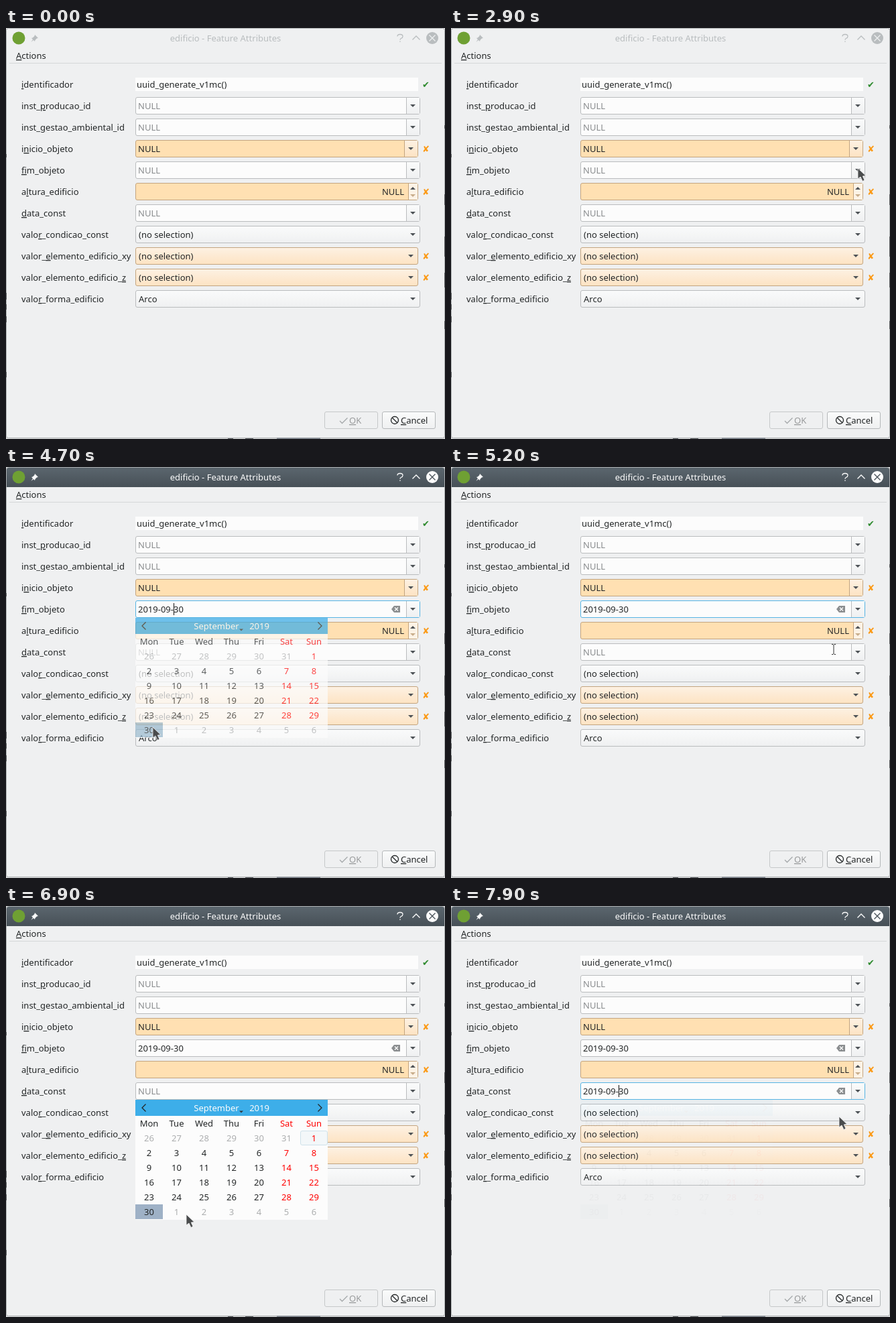
Write an HTML page that moves like this. It is 655 px wide and 613 px high and loops after 8 s.

```html
<!DOCTYPE html>
<html lang="en">
<head>
<meta charset="utf-8">
<title>Feature Attributes</title>
<style>
html, body { margin: 0; width: 100%; height: 100%; overflow: hidden; background: #d9dadb; }
svg { display: block; width: 655px; height: 613px; }
text { font: 13px "Noto Sans", sans-serif; fill: #232627; white-space: pre; }
.u { text-decoration: underline; text-decoration-skip-ink: none; }
.null { fill: #888b8d; }
.mid { text-anchor: middle; }
.end { text-anchor: end; }
.mark { font: 13px "DejaVu Sans", sans-serif; text-anchor: middle; }
.line { fill: none; stroke-width: 1.3; }
.out { fill: #acaeaf; }
.red { fill: #f00; }
.white { fill: #fcfcfc; }
</style>
</head>
<body>
<svg id="stage" viewBox="0 0 655 613"></svg>
<script>
const ORANGE = '#ffe0b2', ORANGE_EDGE = '#c3a580', GREY_EDGE = '#babcbe';
const stage = document.getElementById('stage');

const text = (x, y, s, cls = '', extra = '') => `<text x="${x}" y="${y}" class="${cls}" ${extra}>${s}</text>`;
const rect = (x, y, w, h, fill, extra = '') => `<rect x="${x}" y="${y}" width="${w}" height="${h}" fill="${fill}" ${extra}/>`;
const box = (x, y, w, h, fill, edge, extra = '') =>
  rect(x + .5, y + .5, w - 1, h - 1, fill, `rx="2.5" stroke="${edge}" ${extra}`);
const path = (d, extra) => `<path d="${d}" ${extra}/>`;
const down = (x, y, w = 4, fill = '#4d5256') => path(`M${x - w} ${y - w / 2}h${2 * w}l${-w} ${w}z`, `fill="${fill}"`);
const gradient = (id, from, to) =>
  `<linearGradient id="${id}" x2="0" y2="1"><stop stop-color="${from}"/><stop offset="1" stop-color="${to}"/></linearGradient>`;

function mnemonic(x, y, s, at) {
  return text(x, y, `${s.slice(0, at)}<tspan class="u">${s[at]}</tspan>${s.slice(at + 1)}`);
}

function combo(c, warn) {
  const w = warn ? 422 : 425;
  return box(193, c - 13, w, 26, warn ? 'url(#warm)' : 'url(#cool)', warn ? ORANGE_EDGE : GREY_EDGE)
    + down(warn ? 604 : 607, c);
}

function dateField(c, warn, id) {
  const right = warn ? 615 : 618, edge = warn ? ORANGE_EDGE : GREY_EDGE, fill = warn ? ORANGE : '#fcfcfc';
  return box(193, c - 13, right - 193, 26, fill, edge, id ? `id="${id}Box"` : '')
    + rect(right - 20, c - 12, 19, 24, warn ? 'url(#warm)' : 'url(#cool)')
    + rect(right - 21, c - 12, 1, 24, edge)
    + down(right - 11, c)
    + text(197, c + 5, 'NULL', warn ? '' : 'null', id ? `id="${id}Null"` : '')
    + (id ? `<g id="${id}Set">${text(197, c + 5, '2019-09-30')}
        ${path(`M575 ${c}l4 -5h9v10h-9z`, 'fill="#8b8e90"')}
        ${path(`M580 ${c - 2.5}l5 5m0 -5l-5 5`, 'class="line" stroke="#fcfcfc"')}</g>
        ${rect(250, c - 9, 1, 18, '#111', `id="${id}Caret"`)}` : '');
}

function spinner(c) {
  return box(193, c - 13, 422, 26, ORANGE, ORANGE_EDGE)
    + rect(601, c - 12, 13, 24, '#fdf3e6') + rect(600, c - 12, 1, 24, ORANGE_EDGE)
    + text(594, c + 5, 'NULL', 'end')
    + path(`M603 ${c - 3}h8l-4 -4z`, 'fill="#4d5256"') + down(607, c + 6, 4, '#c9ae8b');
}

const cross = c => text(626.5, c + 5, '✘', 'mark', 'style="fill:#fb9a17"');

// Window controls, tinted for a focused or unfocused title bar
function titleBar(ink, hole) {
  return text(327.5, 20, 'edificio - Feature Attributes', 'mid', `style="fill:${ink}"`)
    + path('M43 10l5 5l-2 .5l-2.5 2.5l-.5 2l-5 -5l2 -.5l2.500 -2.500zM40 17l1 1l-3.500 3z', `fill="${ink}"`)
    + path('M584 12.500q0 -3 4 -3q4 0 4 3q0 2 -2.500 3q-1.500 .8 -1.500 2.200M588 19.500v1.600M606.500 17.500l5.500 -5.500l5.500 5.500',
      `class="line" stroke="${ink}"`)
    + `<circle cx="636" cy="15" r="9" fill="${ink}"/>`
    + path('M631.500 10.500l9 9m0 -9l-9 9', `class="line" stroke="${hole}"`);
}

function calendar() {
  const names = ['Mon', 'Tue', 'Wed', 'Thu', 'Fri', 'Sat', 'Sun'];
  let s = rect(0, 0, 287, 179, '#fcfcfc') + rect(0, 0, 287, 24, '#3daee9')
    + text(121, 17, 'September', 'white mid') + text(185, 17, '2019', 'white mid')
    + down(158, 18, 3, '#31363b')
    + path('M15.500 6.500l-5.500 5.500l5.500 5.500M272.500 6.500l5.500 5.500l-5.500 5.500', 'class="line" stroke="#232627"')
    + rect(0, 156, 41, 22, '#9eb1c6', 'id="picked"')
    + box(246, 46, 41, 22, '#f3f7f9', '#cfe2eb', 'id="hover"');
  names.forEach((n, i) => s += text(20.5 + 41 * i, 40, n, 'mid' + (i > 4 ? ' red' : '')));
  for (let i = 0; i < 42; i++) {
    const d = i - 5, inside = d > 0 && d < 31;
    s += text(20.5 + 41 * (i % 7), 62 + 22 * Math.floor(i / 7), d < 1 ? d + 31 : inside ? d : d - 30,
      'mid ' + (!inside ? 'out' : i % 7 > 4 ? 'red' : ''));
  }
  return s;
}

const labels = [['identificador', 0], ['inst_producao_id', 5], ['inst_gestao_ambiental_id', 5], ['inicio_objeto', 1],
  ['fim_objeto', 0], ['altura_edificio', 1], ['data_const', 0], ['valor_condicao_const', 4],
  ['valor_elemento_edificio_xy', 6], ['valor_elemento_edificio_z', 24], ['valor_forma_edificio', 4]];

stage.innerHTML = `<defs>
    ${gradient('cool', '#fafbfb', '#eff0f1')}${gradient('warm', '#fdf1e3', '#fde3c3')}${gradient('bar', '#5b666e', '#475057')}
  </defs>
  ${rect(.5, .5, 654, 611, '#eff0f1', 'rx="3" stroke="#a9acae"')}
  ${path('M.5 188v5M.5 395v10M.5 412v8M.5 430v9M.5 513v8M654.500 145v5M654.500 248v16M654.500 311v30M654.500 365v22M654.500 437v12',
    'stroke="#54575a"')}
  ${path('M331 612.500h8M357 612.500h12', 'stroke="#54575a"')}${rect(404, 611, 65, 2, '#858b92')}
  ${titleBar('#b9bdbf', '#eff0f1')}
  <g id="active">${path('M1 30V4q0 -3 3 -3H651q3 0 3 3V30z', 'fill="url(#bar)"')}${titleBar('#fcfcfc', '#475057')}</g>
  <circle cx="19" cy="15" r="9.500" fill="#6fa033"/>
  ${mnemonic(15, 46, 'Actions', 0)}${rect(5, 52, 645, 1, '#d5d7d8')}
  ${labels.map(([s, at], i) => mnemonic(23, 89 + 32 * i, s, at)).join('')}
  ${rect(193, 74, 422, 20, '#fcfcfc')}${text(195, 89, 'uuid_generate_v1mc()')}
  ${text(626.5, 89, '✔', 'mark', 'style="fill:#2d8a2d"')}
  ${dateField(116)}${dateField(148)}${dateField(180, true)}${dateField(212, false, 'fim')}
  ${spinner(244)}${dateField(276, false, 'data')}
  ${[308, 340, 372, 404].map(c => combo(c, c === 340 || c === 372)
    + text(198, c + 5, c === 404 ? 'Arco' : '(no selection)')).join('')}
  ${[180, 244, 340, 372].map(cross).join('')}
  ${box(475, 572, 80, 26, '#eff0f1', '#c6c8c9')}
  ${path('M498 586l3.500 3.500l8 -8', 'class="line" stroke="#a5a8aa"')}
  <g opacity=".42">${mnemonic(512, 590, 'OK', 0)}</g>
  ${box(561, 572, 80, 26, 'url(#cool)', '#b5b8ba')}
  ${path('M574.500 585a5.500 5.500 0 1 0 11 0a5.500 5.500 0 1 0 -11 0M576 581l8 8', 'class="line" stroke="#232627"')}
  ${mnemonic(589, 590, 'Cancel', 0)}
  <g id="popup">${calendar()}</g>
  <g id="arrow">${path('M0 0V16L4 13L7 19.500L10 18L7.300 12L12 11.500Z',
    'fill="#4a4c4d" stroke="#f4f4f4" stroke-width=".8" stroke-linejoin="round"')}</g>
  <g id="beam">${path('M-3 -7.500h2l1 1l1 -1h2M0 -6.500v13M-3 7.500h2l1 -1l1 1h2', 'fill="none" stroke="#333"')}</g>`;

// Tracks: [time in tenths of a second, value...]
const pointer = [[12, 652, 158], [15, 638, 153], [19, 620, 145], [21, 615, 149], [24, 601, 166], [27, 601, 166],
  [29, 607, 209], [35, 607, 209], [36, 570, 228], [38, 457, 283], [41, 300, 360], [43, 226, 391], [44, 219, 388],
  [47, 219, 388], [48, 235, 380], [50, 410, 322], [52, 571, 272], [53, 588, 276], [54, 612, 286], [55, 618, 288],
  [58, 608, 283], [64, 608, 283], [65, 590, 292], [67, 430, 372], [69, 269, 460], [70, 232, 469], [72, 208, 452],
  [75, 210, 452], [76, 230, 442], [77, 350, 400], [79, 579, 314]];
const popupFade = [[31, 0], [32, .5], [33, 1], [46, 1], [47, .72], [49, .03], [50, 0],
  [61, 0], [62, .5], [63, 1], [76, 1], [77, .72], [79, .03]];
const focusFade = [[30, 0], [31, .35], [32, .75], [33, 1]];

function at(track, t) {
  const i = track.findIndex(p => p[0] > t);
  if (i < 0) return track.at(-1).slice(1);
  const b = track[i], a = track[i - 1] || b;
  const k = a === b ? 0 : (t - a[0]) / (b[0] - a[0]);
  return a.slice(1).map((v, j) => v + (b[j + 1] - v) * k);
}

const el = id => document.getElementById(id);
const show = (id, on) => el(id).style.visibility = on ? 'visible' : 'hidden';

function setField(id, filled, focused, caret) {
  show(id + 'Null', !filled);
  show(id + 'Set', filled);
  show(id + 'Caret', caret);
  el(id + 'Box').setAttribute('stroke', focused ? '#57b4e3' : GREY_EDGE);
}

function draw(now) {
  const t = Math.floor(now % 8000 / 100);
  const [x, y] = at(pointer, t);
  const beam = t === 52 || t === 53;
  const place = `translate(${x} ${y})`;
  el('arrow').setAttribute('transform', place);
  el('beam').setAttribute('transform', place);
  show('arrow', t >= 12 && !beam);
  show('beam', beam);

  el('active').setAttribute('opacity', at(focusFade, t)[0]);
  el('popup').setAttribute('transform', `translate(193 ${t < 56 ? 225 : 289})`);
  el('popup').setAttribute('opacity', at(popupFade, t)[0]);
  show('hover', t >= 38 && t < 43 || t >= 67 && t < 71);
  el('picked').setAttribute('fill', t >= 43 && t < 56 || t >= 71 ? '#9abace' : '#9eb1c6');

  const fimFocus = t >= 46 && t < 61;
  setField('fim', t >= 46, fimFocus, fimFocus && (t - 46) % 10 < 5);
  setField('data', t >= 76, t >= 76, t >= 76);
}

const start = performance.now();
function tick() {
  draw(performance.now() - start);
  requestAnimationFrame(tick);
}
tick();
</script>
</body>
</html>
```
